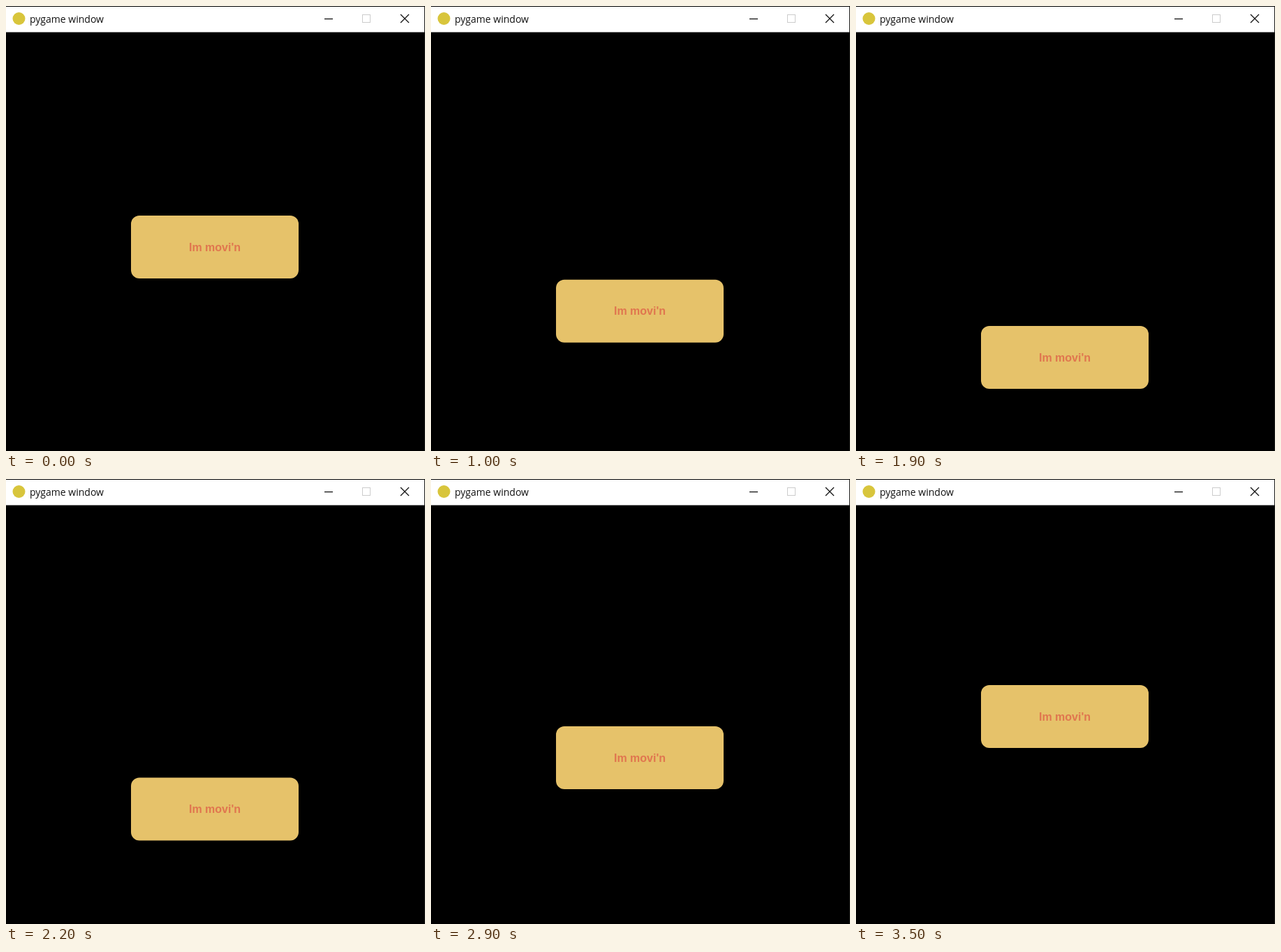
Write an HTML page with a canvas that moves like this. It is 600 px wide and 637 px high and loops after 3600 ms.

```html
<!DOCTYPE html>
<html lang="en">
<head>
<meta charset="utf-8">
<title>pygame window</title>
<style>
html, body { margin: 0; width: 100%; height: 100%; overflow: hidden; background: #000; }
canvas { display: block; width: 600px; height: 637px; }
</style>
</head>
<body>
<canvas id="stage" width="600" height="637"></canvas>
<script>
const ctx = document.getElementById('stage').getContext('2d');
const LOOP = 3600;
const TICK = 100;

// [time in ms, top edge of the button]
const PATH = [
  [0, 300], [600, 347], [1200, 414], [1400, 433], [1800, 475],
  [1900, 458], [2400, 407], [2500, 393.5], [2900, 354], [3000, 338.5], [3500, 295]
];

function buttonTop(t) {
  for (let i = 1; i < PATH.length; i++) {
    const [t0, y0] = PATH[i - 1];
    const [t1, y1] = PATH[i];
    if (t <= t1) return y0 + (y1 - y0) * (t - t0) / (t1 - t0);
  }
  return PATH[PATH.length - 1][1];
}

function rect(x, y, w, h, color) {
  ctx.fillStyle = color;
  ctx.fillRect(x, y, w, h);
}

function line(x0, y0, x1, y1) {
  ctx.beginPath();
  ctx.moveTo(x0, y0);
  ctx.lineTo(x1, y1);
  ctx.stroke();
}

function label(text, x, y, font, color, align) {
  ctx.font = font;
  ctx.fillStyle = color;
  ctx.textAlign = align;
  ctx.fillText(text, x, y);
}

function drawWindow() {
  rect(0, 0, 600, 637, '#000');
  rect(0, 1, 599, 36.5, '#fff');
  rect(599, 0, 1, 637, '#1c1c1a');

  ctx.fillStyle = '#d8c53c';
  ctx.beginPath();
  ctx.arc(18.5, 18, 9, 0, Math.PI * 2);
  ctx.fill();

  label('pygame window', 34, 24, '14px "Open Sans", "Noto Sans", sans-serif', '#111', 'left');

  ctx.lineWidth = 1.3;
  ctx.strokeStyle = '#111';
  line(456, 18.5, 468, 18.5);
  line(565, 12, 577, 24);
  line(577, 12, 565, 24);
  ctx.lineWidth = 1;
  ctx.strokeStyle = '#ccc';
  ctx.strokeRect(510.5, 12.5, 11, 11);
}

function drawButton(y) {
  ctx.fillStyle = '#e6c26a';
  ctx.beginPath();
  ctx.roundRect(179, y, 240, 90, 12);
  ctx.fill();
  label("Im movi'n", 299, y + 50.5, 'bold 16px "Liberation Sans", Arial, sans-serif', '#e0764f', 'center');
}

function frame(now) {
  const t = Math.floor(now % LOOP / TICK) * TICK;
  drawWindow();
  drawButton(buttonTop(t));
  requestAnimationFrame(frame);
}

frame(performance.now());
</script>
</body>
</html>
```
